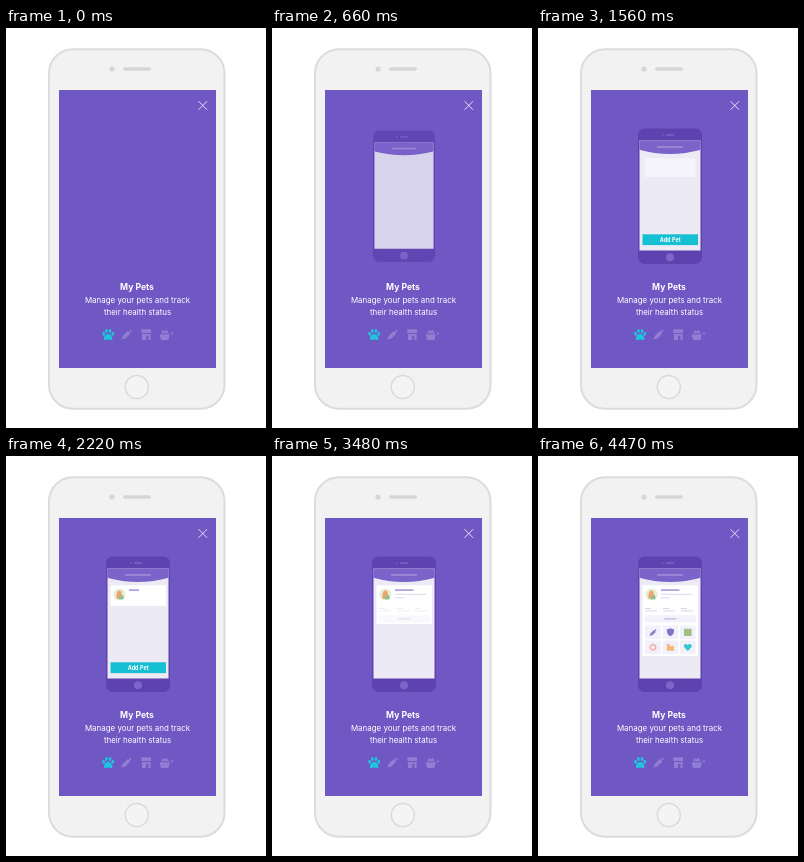
An HTML page for the animation above (4.5 s loop, 260x400 px).

```html
<!DOCTYPE html>
<html lang="en">
<head>
<meta charset="utf-8">
<title>My Pets</title>
<style>
  html, body { margin: 0; width: 100%; height: 100%; overflow: hidden; background: #fff; }
  svg { display: block; width: 260px; height: 400px; }
  text { font-family: Montserrat, Inter, sans-serif; text-anchor: middle; fill: #fff; }
</style>
</head>
<body>
<svg viewBox="0 0 260 400">
  <defs>
    <clipPath id="glass"><rect x="101.5" y="112.5" width="61" height="110"/></clipPath>
  </defs>

  <!-- outer phone -->
  <rect x="43" y="21.3" width="175.5" height="359.4" rx="24" fill="#f2f2f2" stroke="#dcdcdc" stroke-width="2"/>
  <circle cx="106" cy="41" r="2.6" fill="#d6d6d6"/>
  <rect x="117" y="39.3" width="28" height="3.4" rx="1.7" fill="#d6d6d6"/>
  <circle cx="130.8" cy="359" r="11.5" fill="#f4f4f4" stroke="#d9d9d9" stroke-width="1.4"/>
  <rect x="53" y="62" width="157" height="278" fill="#6f57c4"/>
  <path d="M192.5 73.2l8.6 8.6m0-8.6l-8.6 8.6" stroke="#e6e1f6" fill="none"/>

  <text x="131" y="261.8" font-size="8.6" font-weight="700">My Pets</text>
  <g font-size="7.95">
    <text x="131.5" y="274.6">Manage your pets and track</text>
    <text x="131.5" y="287.4">their health status</text>
  </g>

  <!-- tab icons -->
  <g fill="#1fc3de">
    <ellipse cx="97.7" cy="305.9" rx="1.4" ry="1.9" transform="rotate(-20 97.7 305.9)"/>
    <ellipse cx="100.4" cy="303" rx="1.4" ry="2"/>
    <ellipse cx="104" cy="303" rx="1.4" ry="2"/>
    <ellipse cx="106.7" cy="305.9" rx="1.4" ry="1.9" transform="rotate(20 106.7 305.9)"/>
    <path d="M102.2 305.8c2 0 4.3 3 4.3 4.7c0 2.4-2.6 1.1-4.3 1.1s-4.3 1.3-4.3-1.1c0-1.7 2.3-4.7 4.3-4.7z"/>
  </g>
  <g fill="#907ed2">
    <path d="M115 312l1.6-4 5-5 .9.9 1.9-2.4 1.4 1.4-2.4 1.9.8.9-5 5-2.8.2z"/>
    <path d="M135.3 301.3h9.8v3.7h-9.8zM136 306h8.6v6h-2.2v-4.2h-2.2v4.2H136z"/>
    <path d="M153.5 306.3h10.5l-1.6 5.7h-7.3zM155 305.3l1.8-3.4 2 1.5 1.5-2 2.6 3.9z"/>
    <circle cx="165.9" cy="305.4" r="1.1"/>
  </g>

  <!-- inner phone -->
  <g id="phone">
    <rect x="100" y="100.5" width="64" height="135.5" rx="6.5" fill="#5e43b0"/>
    <circle cx="124.7" cy="107" r=".8" fill="#7c66c9"/>
    <rect x="128" y="106.3" width="8" height="1.4" rx=".7" fill="#7c66c9"/>
    <circle cx="132" cy="229.3" r="4" fill="#7c66c9"/>
    <g clip-path="url(#glass)">
      <rect x="101" y="112" width="62" height="111" fill="#ebeaf5"/>
      <path d="M101 112h62v9.8q-31 8.4-62 0z" fill="#7a63c9"/>
      <rect x="119" y="118.3" width="26" height="1.4" rx=".7" fill="#a293da"/>

      <rect id="stats" x="104.5" y="149" width="55.5" height="19" fill="#fff"/>
      <rect id="panel" x="104.5" y="168" width="55.5" height="32" fill="#fff"/>
      <g id="details">
        <g id="columns" fill="#d9d5ec"></g>
        <rect x="107" y="159.3" width="51" height="7.2" rx="1" fill="#f3f1fa"/>
        <rect x="126.3" y="162.2" width="12" height="1.3" fill="#c3b9e6"/>
      </g>
      <g id="tiles"></g>

      <g id="card">
        <rect x="104.5" y="129.3" width="55.5" height="20.7" rx="1" fill="#fff"/>
        <g id="avatar">
          <circle cx="113.5" cy="138.4" r="6" fill="#e3efd6"/>
          <path d="M110.4 142.8c0-4 .4-7.6 2.6-8.2c2-.3 3 1.6 2.6 3.6c2 1.2 2.4 3 1.8 4.6z" fill="#f0a36d"/>
          <path d="M113 143.6c0-2.8 1-4.4 2.3-4.4s2.2 1.8 2.1 4z" fill="#7cc79a"/>
        </g>
        <rect id="name" x="123" y="133.3" height="1.6" fill="#a99ade"/>
        <rect id="line1" x="123" y="137.8" height="1" fill="#dcd8ee"/>
        <rect id="line2" x="123" y="141.4" height="1" fill="#dcd8ee"/>
      </g>

      <g id="button">
        <rect x="104.5" y="206.3" width="55.5" height="10.8" fill="#17bfd3"/>
        <text x="132.2" y="213.7" font-size="5.5" font-weight="700">Add Pet</text>
      </g>
      <circle id="touch" fill="#8d86a8"/>
    </g>
  </g>
</svg>
<script>
const LOOP = 4500;
const $ = id => document.getElementById(id);
const set = (el, attrs) => { for (const k in attrs) el.setAttribute(k, attrs[k]); };
const clamp = x => Math.max(0, Math.min(1, x));
const smooth = x => x * x * (3 - 2 * x);
const easeOut = x => 1 - (1 - x) ** 3;
const span = (t, a, b, ease = smooth) => ease(clamp((t - a) / (b - a)));
const zoom = (x, y, s) => `translate(${x} ${y}) scale(${s}) translate(${-x} ${-y})`;

$('columns').innerHTML = [107, 125, 143].map(x =>
  `<rect x="${x}" y="152" width="6" height="1"/><rect x="${x}" y="154.4" width="12" height="1"/>`).join('');

// Tile glyphs are drawn around their own centre.
const glyphs = [
  ['#8a83c6', 'M-3.5 3.5l1-2.6 3.3-3.3.7.6 1.2-1.4.9.9-1.4 1.2.6.7-3.3 3.3z'],
  ['#8074c4', 'M0-4l3.6 1.2c.2 3.5-1 5.6-3.6 6.8c-2.6-1.2-3.8-3.3-3.6-6.8z'],
  ['#a3bf86', 'M-3.8-3.6h7.6v7.2h-7.6z'],
  ['#f3b3b0', 'M0-3.6a3.6 3.6 0 1 1-.1 0zM-.1-1.9a1.9 1.9 0 1 0 .1 0z'],
  ['#f5b877', 'M-3.6-3.2h3v2h4.2v4.6h-7.2z'],
  ['#35c7cf', 'M0 3.6l-3.6-3.7c-1.5-3 2.2-4.6 3.6-1.8c1.4-2.8 5.1-1.2 3.6 1.8z']
];
const starts = [3960, 4020, 4080, 3900, 3820, 4140];
$('tiles').innerHTML = glyphs.map(([color, d]) =>
  `<g><rect x="-7.8" y="-6.7" width="15.6" height="13.4" rx="1" fill="#f2f0fa"/><path d="${d}" fill="${color}"/></g>`).join('');

function drawTouch(t) {
  const first = t < 2000, start = first ? 960 : 2780;
  const press = span(t, start, start + 160), release = span(t, start + 200, start + 340);
  set($('touch'), {
    cx: first ? 132.2 : 139.5, cy: first ? 211.7 : 138.5,
    r: 2 + 2.5 * press + 4 * release,
    opacity: 0.6 * press * (1 - release)
  });
}

function draw(t) {
  const show = span(t, 270, 790);
  set($('phone'), { opacity: show, transform: zoom(132, 168.3, 0.8 + 0.2 * show) });

  const drop = 18 * (1 - span(t, 790, 895, easeOut) + span(t, 2480, 2760));
  set($('button'), { transform: `translate(0 ${drop})` });

  const card = span(t, 1350, 1800);
  set($('card'), { opacity: card, transform: zoom(132, 139.6, 0.85 + 0.15 * card) });
  const face = span(t, 1880, 2080, easeOut);
  set($('avatar'), { opacity: face, transform: zoom(113.5, 138.4, face) });
  set($('name'), { width: 18.5 * span(t, 2110, 2320) });
  set($('line1'), { width: 31 * span(t, 2320, 2600) });
  set($('line2'), { width: 9 * span(t, 2520, 2740) });

  set($('stats'), { height: 19 * span(t, 3120, 3440) });
  set($('panel'), { height: 32 * span(t, 3480, 3760) });
  set($('details'), { opacity: span(t, 3300, 3700) });
  [...$('tiles').children].forEach((tile, i) => {
    const s = span(t, starts[i], starts[i] + 240);
    const x = 115 + 17.4 * (i % 3), y = 176.3 + 15 * Math.floor(i / 3);
    set(tile, { transform: `translate(${x} ${y}) scale(${s})` });
  });

  drawTouch(t);
}

const begin = performance.now();
function tick() {
  draw((performance.now() - begin) % LOOP);
  requestAnimationFrame(tick);
}
tick();
</script>
</body>
</html>
```
